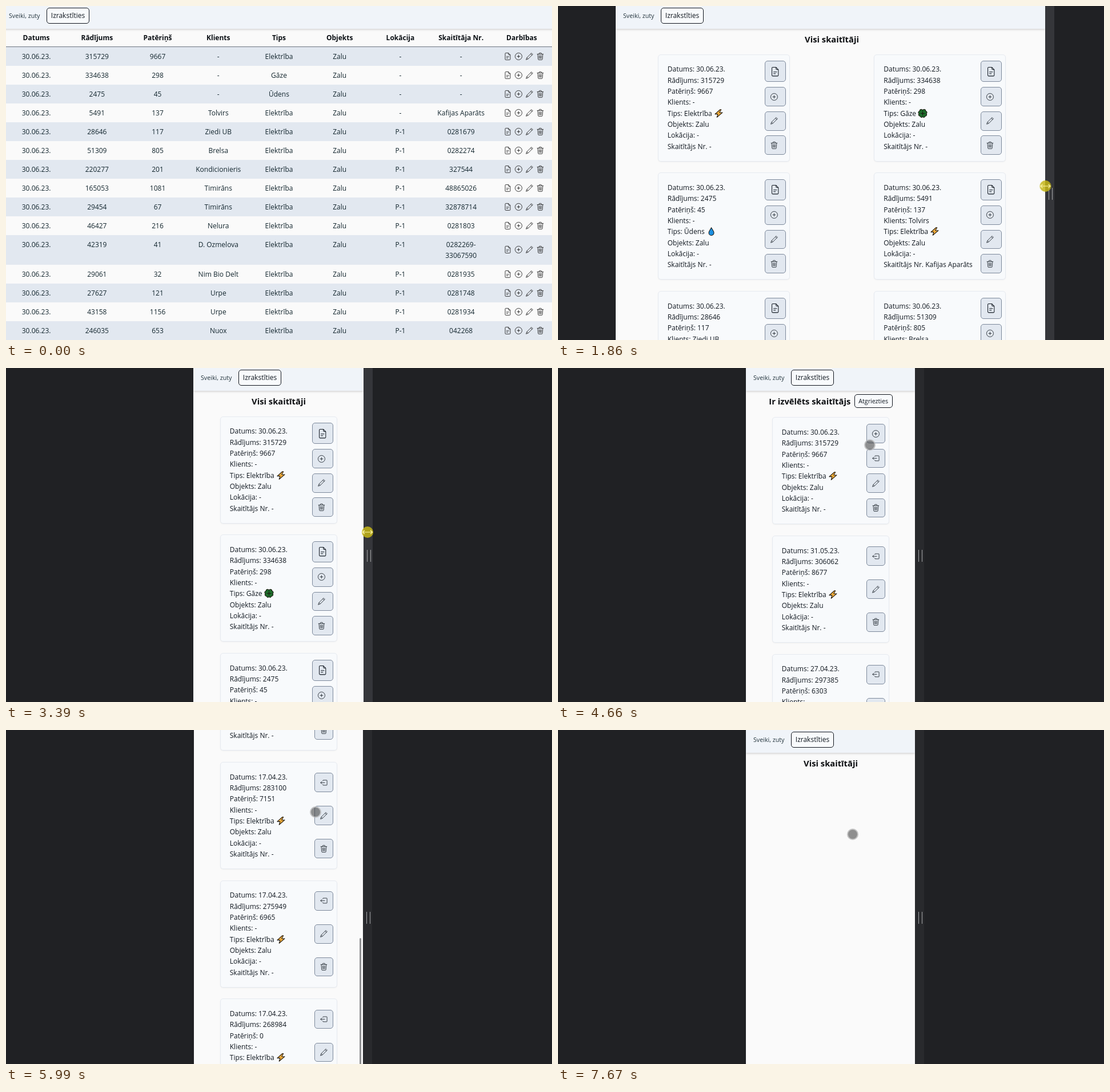
An HTML page that plays this animation: 956 px wide and 586 px high, repeating every 8 s.

```html
<!DOCTYPE html>
<html lang="lv">
<head>
<meta charset="utf-8">
<title>Skaitītāji</title>
<style>
* { box-sizing: border-box; margin: 0; padding: 0; }
html, body { width: 100%; height: 100%; overflow: hidden; background: #202124; }
body { position: relative; font: 12px/19.35px "Open Sans", "Noto Sans", sans-serif; color: #111820; white-space: nowrap; }
body * { animation-duration: 8s; animation-iteration-count: infinite; animation-timing-function: step-end; }

.view { position: absolute; top: 0; bottom: 0; left: -8px; right: -8px; animation-name: resize; }
.page { position: absolute; inset: 0; overflow: hidden; background: #fafafa; container-type: inline-size; }
.content { position: absolute; inset: 0; animation-name: scroll; }
.bar { position: absolute; left: 100%; top: 0; bottom: 0; width: 16px; background: #292a2d; animation-name: grab; }
.bar::after { content: ""; position: absolute; left: 6px; top: 319px; width: 5px; height: 21px; border: solid #a3a4a6; border-width: 0 1.5px; }
.thumb { position: absolute; right: 3px; top: 0; width: 3px; height: 277px; border-radius: 2px; background: #909193; animation-name: thumb; }

nav { position: absolute; z-index: 1; top: 0; left: 0; right: 0; height: 40px; background: #f0f4f9; box-shadow: 0 1px 4px rgba(0,0,0,.2); }
nav span { position: absolute; left: 13px; top: 7.5px; font-size: 10.7px; color: #23343d; }
.pill { border: 1px solid #10151d; border-radius: 5px; text-align: center; background: #f8fafc; }
nav .pill { position: absolute; left: 79px; top: 3px; width: 75px; height: 28px; line-height: 26.5px; }

.table { position: absolute; top: 40px; left: 8px; right: 8px; color: #14272f; white-space: normal; }
.row { display: grid; grid-template-columns: repeat(9, minmax(0, 1fr)); text-align: center; padding: 6.8px 0; }
.row:nth-child(even) { background: #e2e8f0; }
.head { height: 32.4px; padding: 6.3px 0; font-weight: 700; color: #0a0f14; border-bottom: 1px solid #6c7480; }
.tools { display: flex; justify-content: center; gap: 6.4px; padding-left: 8px; align-self: center; color: #111; }

h2 { font-size: 14.75px; line-height: 24px; font-weight: 700; color: #0b0d10; }
.title { position: absolute; left: 0; top: 45.5px; text-align: center; }
.picked { position: absolute; left: 0; width: calc(100% + 1px); top: 46px; display: flex; justify-content: center; gap: 6.5px; }
.picked .pill { width: 67px; height: 24px; line-height: 22.5px; font-size: 10.7px; }
.grid { position: absolute; left: 0; top: 84.6px; display: grid; justify-items: center; row-gap: 19.5px; }
.detail .grid { top: 86.2px; }
.title, .grid { width: calc(100% + 1px); }
.card { position: relative; width: 205.5px; height: 188.2px; padding: 15.8px 16px; border: 1px solid #e6eaf0; border-radius: 5px; background: #f8fafc; box-shadow: 0 1px 2px rgba(0,0,0,.05); }
.side { position: absolute; right: 6px; top: 6.2px; bottom: 6.2px; display: flex; flex-direction: column; justify-content: space-around; }
.side b { display: block; padding: 9.4px; border: 1px solid #7d899b; border-radius: 5px; background: #e2e8f0; }
svg { display: block; width: 12.9px; height: 12.9px; fill: none; stroke: currentColor; overflow: visible; }
.side .big { width: 16.4px; height: 16.4px; }
.card .emoji { display: inline-block; width: 15px; height: 15px; margin-left: 1px; vertical-align: -3px; stroke: #1b1710; stroke-width: 1.1; stroke-linejoin: round; }

.list, .cards, .detail { position: absolute; inset: 0; }
.list { animation-name: list; }
.list .cards { animation-name: leave; }
.detail { animation-name: detail; }
.detail .cards { animation-name: appear; }

@container (min-width: 825px) { .list .grid, .title { display: none; } }
@container (max-width: 824.9px) { .table { display: none; } }
@container (min-width: 516px) {
  .title, .list .grid { width: calc(100% + 5px); }
  .list .grid { grid-template-columns: 1fr 1fr; }
  .list .card { width: 231px; }
}

.hand, .dot { position: absolute; left: -10px; top: -10px; width: 20px; height: 20px; border-radius: 50%; opacity: 0; }
.hand { background: rgba(196,181,24,.85); animation-name: hand; }
.hand svg { width: 20px; height: 20px; stroke: #fff7a8; stroke-width: 1.2; }
.dot { background: rgba(60,60,60,.56); border: 2px solid rgba(250,250,250,.5); animation-name: dot; }

@keyframes resize {
  0% { left: -8px; right: -8px; }
  17.3125% { left: -8px; right: -8px; animation-timing-function: steps(7); }
  23.25% { left: 101px; right: 103px; animation-timing-function: steps(5); }
  27.375% { left: 156px; right: 158px; animation-timing-function: steps(5); }
  31.5% { left: 208px; right: 210px; animation-timing-function: steps(8); }
  38.25% { left: 302px; right: 304px; animation-timing-function: steps(5); }
  42.375% { left: 328px; right: 330px; }
  44%, 100% { left: 329px; right: 331px; }
}
@keyframes grab {
  0%, 44%, 100% { background: #292a2d; }
  17.3125% { background: #35363a; }
}
@keyframes scroll {
  0% { transform: none; }
  64% { transform: translateY(0); animation-timing-function: steps(11, start); }
  74.0875% { transform: translateY(-888px); }
  74.875% { transform: translateY(-861px); animation-timing-function: steps(12); }
  84.875%, 100% { transform: translateY(0); }
}
@keyframes thumb {
  0% { transform: translateY(0); opacity: 0; }
  64% { transform: translateY(0); opacity: 1; animation-timing-function: steps(11, start); }
  74.0875% { transform: translateY(376px); opacity: 1; }
  74.875% { transform: translateY(365px); opacity: 1; animation-timing-function: steps(12); }
  84.875% { transform: translateY(0); opacity: 1; }
  86.5% { transform: translateY(0); opacity: 1; animation-timing-function: steps(3); }
  89% { transform: translateY(0); opacity: 0; }
  100% { transform: translateY(0); opacity: 0; }
}
@keyframes list { 0%, 92.5%, 100% { opacity: 1; } 51.5% { opacity: 0; } }
@keyframes leave { 0% { opacity: 1; } 51.5%, 100% { opacity: 0; } }
@keyframes detail { 0%, 92.5%, 100% { opacity: 0; } 51.5% { opacity: 1; } }
@keyframes appear {
  0% { opacity: 0; }
  55.625% { opacity: 0; animation-timing-function: steps(4, start); }
  59.125%, 100% { opacity: 1; }
}
@keyframes hand {
  0% { transform: translate(980px, 620px); opacity: 1; }
  3.25% { transform: translate(931px, 578px); }
  4.125% { transform: translate(943px, 486px); }
  5% { transform: translate(985px, 330px); }
  17.3125% { transform: translate(972px, 328px); animation-timing-function: steps(7); }
  23.25% { transform: translate(853.5px, 316px); animation-timing-function: steps(5); }
  27.375% { transform: translate(801px, 309px); animation-timing-function: steps(5); }
  31.5% { transform: translate(749.5px, 303px); animation-timing-function: steps(8); }
  38.25% { transform: translate(659px, 294px); animation-timing-function: steps(5); }
  42.375% { transform: translate(633px, 288px); opacity: 1; }
  44% { transform: translate(628px, 277px); opacity: 1; }
  44.875%, 100% { transform: translate(628px, 277px); opacity: 0; }
}
@keyframes dot {
  0% { transform: translate(612px, 258px); opacity: 0; }
  44.875% { transform: translate(612px, 258px); opacity: 1; animation-timing-function: steps(5); }
  49% { transform: translate(546px, 135px); opacity: 1; }
  64% { transform: translate(546px, 135px); opacity: 1; animation-timing-function: steps(11, start); }
  74.0875% { transform: translate(542px, 144px); opacity: 1; }
  85.75% { transform: translate(542px, 144px); opacity: 1; animation-timing-function: steps(5, start); }
  90% { transform: translate(552px, 50px); opacity: 1; }
  92.5% { transform: translate(552px, 50px); opacity: 1; animation-timing-function: steps(3); }
  95% { transform: translate(516px, 182px); opacity: 1; }
  95.875%, 100% { transform: translate(516px, 183px); opacity: 1; }
}
</style>
</head>
<body>
<div class="view">
  <div class="page">
    <div class="content">
      <nav><span>Sveiki, zuty</span><div class="pill">Izrakstīties</div></nav>
      <div class="list">
        <div class="table" id="table"></div>
        <h2 class="title">Visi skaitītāji</h2>
        <div class="cards"><div class="grid" id="all"></div></div>
      </div>
      <div class="detail">
        <div class="picked"><h2>Ir izvēlēts skaitītājs</h2><div class="pill">Atgriezties</div></div>
        <div class="cards"><div class="grid" id="history"></div></div>
      </div>
    </div>
    <div class="thumb"></div>
  </div>
  <div class="bar"></div>
</div>
<div class="hand"><svg viewBox="0 0 20 20"><path d="M1.5 10h17M5 6.8L1.5 10 5 13.2M15 6.8l3.500 3.200-3.500 3.200"/></svg></div>
<div class="dot"></div>
<script>
const shapes = {
  doc: 'M9.500.5H4A1.500 1.500 0 0 0 2.500 2v12A1.500 1.500 0 0 0 4 15.500h8a1.500 1.500 0 0 0 1.500-1.500V4.500zV3A1.500 1.500 0 0 0 11 4.500h2.500M5 8.500h6M5 11.500h4',
  plus: 'M.5 8a7.500 7.500 0 1 0 15 0a7.500 7.500 0 1 0-15 0M8 4.500v7M4.500 8h7',
  pen: 'M12.500.7l2.800 2.800-10 10L.8 15.200l1.700-4.500zM10.700 2.500l2.800 2.800M2.600 10.700l2.700 2.700',
  bin: 'M1 3h14M5.500 3V1.500a1 1 0 0 1 1-1h3a1 1 0 0 1 1 1V3M2.500 3l.9 11a1.500 1.500 0 0 0 1.500 1.400h6.200a1.500 1.500 0 0 0 1.500-1.400l.9-11M5.500 5.500l.4 7.500M8 5.500V13M10.500 5.500l-.4 7.500',
  back: 'M6 4.500v-1a1 1 0 0 1 1-1h7a1 1 0 0 1 1 1v9a1 1 0 0 1-1 1H7a1 1 0 0 1-1-1v-1M10.500 8H1M4 5L1 8l3 3'
};
const emoji = {
  'Elektrība': ['#fbb13c', 'M10.500.8L1 9.200h5.200L4.500 15.200 15 6.300H9.300L12.500.8z'],
  'Gāze': ['#1d6b2a', 'M8 2C10-1 14 .5 13.500 3.500C17 4 16.500 8 14.500 8C17 10 15 13.500 12.500 13C12 16 9 16 8 14C7 16 4 16 3.500 13C1 13.500-1 10 1.500 8C-.5 8-1 4 2.500 3.500C2 .5 6-1 8 2zM8 4v8M4 8h8'],
  'Ūdens': ['#1c8fe0', 'M8 .8C10 5 12.800 7.500 12.800 10.700a4.800 4.800 0 0 1-9.600 0C3.200 7.500 6 5 8 .8z']
};
const svg = (d, cls = '', fill = 'none') =>
  `<svg class="${cls}" viewBox="0 0 16 16"><path fill="${fill}" d="${d}"/></svg>`;

const kinds = { E: 'Elektrība', G: 'Gāze', U: 'Ūdens' };
const place = 'Zalu';
const meters = `315729|9667|-|E|-|-
334638|298|-|G|-|-
2475|45|-|U|-|-
5491|137|Tolvirs|E|-|Kafijas Aparāts
28646|117|Ziedi UB|E|P-1|0281679
51309|805|Brelsa|E|P-1|0282274
220277|201|Kondicionieris|E|P-1|327544
165053|1081|Timirāns|E|P-1|48865026
29454|67|Timirāns|E|P-1|32878714
46427|216|Nelura|E|P-1|0281803
42319|41|D. Ozmelova|E|P-1|0282269-33067590
29061|32|Nim Bio Delt|E|P-1|0281935
27627|121|Urpe|E|P-1|0281748
43158|1156|Urpe|E|P-1|0281934
246035|653|Nuox|E|P-1|042268`.split('\n').map(line => {
  const [read, used, client, kind, spot, no] = line.split('|');
  return ['30.06.23.', read, used, client, kinds[kind], place, spot, no];
});

// Each reading is the previous one less its consumption.
const dates = ['30.06.23.', '31.05.23.', '27.04.23.', '24.04.23.', '17.04.23.', '17.04.23.', '17.04.23.'];
let total = 315729;
const history = [9667, 8677, 6303, 7982, 7151, 6965, 0].map((used, i) => {
  const entry = [dates[i], total, used, '-', kinds.E, place, '-', '-'];
  total -= used;
  return entry;
});

const heads = ['Datums', 'Rādījums', 'Patēriņš', 'Klients', 'Tips', 'Objekts', 'Lokācija', 'Skaitītāja Nr.', 'Darbības'];
const cells = list => list.map(text => `<div>${text}</div>`).join('');
const tools = ['doc', 'plus', 'pen', 'bin'];
const toolbar = `<div class="tools">${tools.map(name => svg(shapes[name])).join('')}</div>`;

const labels = ['Datums:', 'Rādījums:', 'Patēriņš:', 'Klients:', 'Tips:', 'Objekts:', 'Lokācija:', 'Skaitītājs Nr.'];
const card = (values, buttons) => {
  const lines = values.map((value, i) => {
    const mark = emoji[value];
    return `${labels[i]} ${value}` + (mark ? ' ' + svg(mark[1], 'emoji', mark[0]) : '');
  });
  const side = buttons.map(name => `<b>${svg(shapes[name], name === 'doc' ? 'big' : '')}</b>`).join('');
  return `<div class="card">${cells(lines)}<div class="side">${side}</div></div>`;
};

const fill = (id, html) => { document.getElementById(id).innerHTML = html; };
fill('table', `<div class="row head">${cells(heads)}</div>` +
  meters.map(values => `<div class="row">${cells(values)}${toolbar}</div>`).join(''));
fill('all', meters.slice(0, 6).map(values => card(values, tools)).join(''));
fill('history', history.map((values, i) =>
  card(values, i ? ['back', 'pen', 'bin'] : ['plus', 'back', 'pen', 'bin'])).join(''));
</script>
</body>
</html>
```
